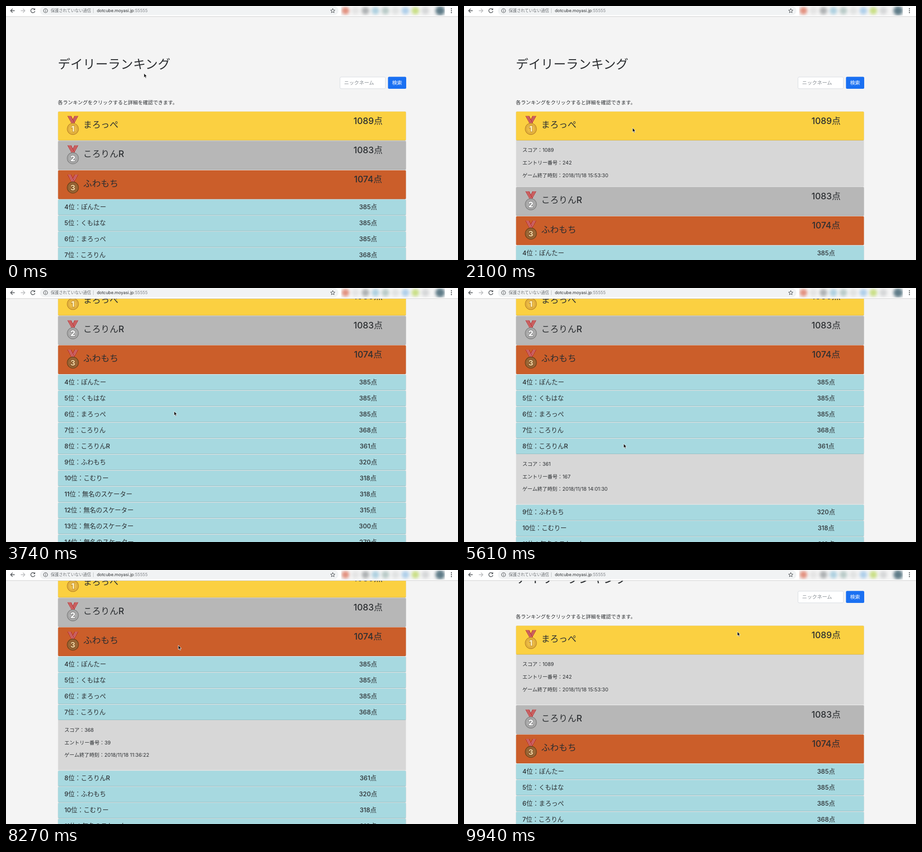
Write an HTML page that moves like this. It is 960 px wide and 540 px high and loops after 9.97 s.

```html
<!DOCTYPE html>
<html lang="ja">
<head>
<meta charset="utf-8">
<title>デイリーランキング</title>
<style>
html, body { margin: 0; height: 100%; overflow: hidden; background: #f4f4f4; }
svg { display: block; }
text { font-family: Inter, "Noto Sans CJK JP", "Noto Sans CJK", sans-serif; fill: #2b2e31; white-space: pre; }
.b { font-weight: 500; }
</style>
</head>
<body>
<svg id="stage" width="960" height="540" viewBox="0 0 960 540"></svg>
<script>
const LOOP = 9970, PANEL = 106.67, TOP = 224.3;
const BODY = 10.67, H5 = 13.33, H3 = 18.67, H1 = 26.67;

// Rank order: name, score, and optionally entry number, end time, toggles [ms, open]
const rows = [
  ['まろっぺ', 1089, 242, '15:53:30', [[1250, 1], [2069, 0], [9250, 1]]],
  ['ころりんR', 1083],
  ['ふわもち', 1074],
  ['ぽんたー', 385],
  ['くもはな', 385],
  ['まろっぺ', 385],
  ['ころりん', 368, 39, '11:36:22', [[6900, 1]]],
  ['ころりんR', 361, 167, '14:01:30', [[4550, 1], [6150, 0]]],
  ['ふわもち', 320],
  ['こむりー', 318],
  ['無名のスケーター', 318],
  ['無名のスケーター', 315],
  ['無名のスケーター', 300],
  ['無名のスケーター', 279],
];
const rowColors = ['#fbd041', '#b7b7b7', '#cb5e2a'];
// Disc, rim and digit colours
const medals = [
  ['#edbd45', '#c08a2a', '#fff3c4'],
  ['#b3b3b3', '#808080', '#ffffff'],
  ['#a56e3c', '#6b4219', '#f1cf9c'],
];

// Text placed by its vertical centre; Latin letters and digits can be medium weight
function text(s, x, cy, size, { fill, anchor, medium } = {}) {
  const body = medium ? s.replace(/\w+/g, '<tspan class="b">$&</tspan>') : s;
  return `<text x="${x}" y="${cy + size * 0.36}" font-size="${size}"` +
    (anchor ? ` text-anchor="${anchor}"` : '') +
    (fill ? ` style="fill:${fill}"` : '') + `>${body}</text>`;
}

function rect(x, y, w, h, fill, extra = '') {
  return `<rect x="${x}" y="${y}" width="${w}" height="${h}" fill="${fill}" ${extra}/>`;
}

function medal(i) {
  const [disc, rim, digit] = medals[i];
  const band = `<path d="M-11.5-27.5H-3.5L4-12H-3Z" fill="#b92f33"/>
    <path d="M-9-27.5L-1.2-12M-6.2-27.5L1.8-12" stroke="#f1dcd2" stroke-width=".8"/>`;
  return `<g transform="translate(142 37)">
    <g transform="scale(-1 1)">${band}</g>${band}
    <circle r="11.8" fill="${disc}" stroke="${rim}" stroke-width="1.6"/>
    <circle r="9" fill="none" stroke="${rim}" stroke-width=".7"/>
    <text y="6" font-size="16.5" font-weight="800" text-anchor="middle" stroke="${rim}"
      stroke-width="2" paint-order="stroke" style="fill:${digit}">${i + 1}</text></g>`;
}

const pitch = i => i < 3 ? 62.33 : 34;

function row([name, score, entry, time], i) {
  const big = i < 3, h = pitch(i) - 0.9, size = big ? H3 : H5;
  const label = big ? text(name, 164, 28, size, { medium: true })
    : text(`${i + 1}位：${name}`, 124, 15.8, size, { medium: true });
  const panel = !entry ? '' : `<svg class="panel" x="110" y="${h}" width="740" height="0">
    ${rect(0.6, 0, 738.8, PANEL, '#d7d7d7')}
    ${text(`スコア：${score}`, 14, 20.9, BODY)}
    ${text(`エントリー番号：${entry}`, 14, 47.6, BODY)}
    ${text(`ゲーム終了時刻：2018/11/18 ${time}`, 14, 74.3, BODY)}</svg>`;
  return `<g class="row">${panel}
    ${rect(110, -0.4, 740, h + 0.4, '#dedede', 'rx="2.5"')}
    ${rect(110.6, 0.2, 738.8, h - 0.2, rowColors[i] || '#a7d9e0', 'rx="2"')}
    ${rect(110.6, h - 0.8, 738.8, 0.8, '#000', 'opacity=".17"')}
    ${big ? medal(i) : ''}${label}
    ${text(`${score}点`, 769, big ? 19.8 : 15.8, size, { anchor: 'middle', medium: true })}</g>`;
}

function toolbar() {
  const blobs = ['#e2907f', '#e4e4e4', '#adb1b3', '#aed0e0', '#b9cbc8', '#e0e2e2', '#afcfea', '#c9df86', '#d5d7d8']
    .map((c, i) => `<circle cx="${721 + i * 21.2}" cy="10" r="8" fill="${c}"/>`).join('');
  const arrow = '<path d="M4.5 0H-4M0-4.2L-4.2 0L0 4.2"/>';
  return `${rect(0, 0, 960, 22, '#fff')}${rect(0, 22, 960, 1, '#cfcfcf')}
    ${rect(72, 0.5, 634, 19, '#f1f3f4', 'rx="9.5"')}
    <g fill="none" stroke="#4d5155" stroke-width="1.4">
      <g transform="translate(14 10)">${arrow}</g>
      <g transform="translate(36 10) scale(-1 1)" stroke="#b9bbbd">${arrow}</g>
      <path d="M60.6 7.2A4.4 4.4 0 1 0 61.4 11"/><path d="M61.9 4.5V8.6H57.8Z" fill="#4d5155" stroke="none"/>
      <circle cx="84" cy="10" r="4.2" stroke-width="1.1"/><path d="M84 9.4V12.4M84 7.3V8.5" stroke-width="1.1"/>
      <path d="M694 5.4L695.3 8.6L698.7 8.8L696.1 11L696.9 14.3L694 12.5L691.1 14.3L691.9 11L689.3 8.8L692.7 8.6Z" stroke-width="1"/>
    </g>
    ${text('保護されていない通信', 95, 10, 8.6, { fill: '#6d7175' })}
    ${rect(185, 5, 0.8, 10, '#b5b8bb')}
    ${text('dotcube.moyasi.jp<tspan style="fill:#85898d">:55555</tspan>', 193, 10, 9.05)}
    <clipPath id="strip"><rect x="712" y="1" width="220" height="19.5"/></clipPath>
    <filter id="soft" x="-20%" y="-60%" width="140%" height="220%"><feGaussianBlur stdDeviation="3"/></filter>
    <g clip-path="url(#strip)">${rect(712, 1, 220, 20, '#f5f5f5')}
      <g filter="url(#soft)">${blobs}<circle cx="922" cy="10" r="10" fill="#5f7b88"/></g></g>
    ${[6, 10, 14].map(y => `<circle cx="946" cy="${y}" r="1.2" fill="#4d5155"/>`).join('')}`;
}

const stage = document.getElementById('stage');
stage.innerHTML = `${rect(0, 0, 960, 540, '#f4f4f4')}
  <g id="page">
    ${text('デイリーランキング', 110, 123.5, H1)}
    ${rect(709.4, 151, 96.4, 24.8, '#fff', 'rx="2.5" stroke="#ced4da" stroke-width=".8"')}
    ${text('ニックネーム', 718, 163.3, BODY, { fill: '#868c92' })}
    ${rect(811.3, 150.6, 38.7, 25.4, '#1a70f2', 'rx="2.5"')}
    ${text('検索', 830.6, 163.3, BODY, { fill: '#fff', anchor: 'middle' })}
    ${text('各ランキングをクリックすると詳細を確認できます。', 110, 205.3, BODY)}
    ${rows.map(row).join('')}
  </g>
  ${rect(953.7, 22, 5, 0, '#6c6c6c', 'id="thumb" rx="2.5"')}
  ${toolbar()}
  <path id="cursor" d="M0 0V9.2L2.1 7.3L3.5 10.6L5.1 9.9L3.7 6.7H6.5Z" fill="#111" stroke="#fff" stroke-width=".8"/>`;

const [page, thumb, cursor] = ['page', 'thumb', 'cursor'].map(id => document.getElementById(id));
const groups = [...stage.querySelectorAll('.row')];

const clamp = v => Math.min(1, Math.max(0, v));
const smooth = p => p * p * (3 - 2 * p);

// CSS "ease": cubic-bezier(.25, .1, .25, 1)
function ease(p) {
  let lo = 0, hi = 1;
  for (let i = 0; i < 18; i++) {
    const s = (lo + hi) / 2;
    if (0.75 * s * (1 - s) + s ** 3 < p) lo = s; else hi = s;
  }
  return 0.3 * lo * (1 - lo) ** 2 + 3 * lo * lo * (1 - lo) + lo ** 3;
}

function panelHeight(toggles, t) {
  let open = 0;
  for (const [at, to] of toggles) {
    if (t >= at) open = 1 - to + (2 * to - 1) * ease(clamp((t - at) / 350));
  }
  return open * PANEL;
}

// Momentum scrolling: start, from, to
const flicks = [[2522, 0, 227.3], [8450, 227.3, 106]];
function scrollAt(t) {
  let y = 0;
  for (const [at, from, to] of flicks) {
    const dt = t - at;
    if (dt >= 0) y = dt > 1000 ? to : to + (from - to) * Math.exp(-dt / 250 - (dt / 900) ** 4);
  }
  return y;
}
const thumbAlpha = t => Math.max(...flicks.map(([at]) =>
  t < at ? 0 : 1 - clamp((t - at - 950) / 220)));

const path = [
  [0, 293, 143], [150, 293, 143], [1050, 358, 259], [3150, 358, 259], [3600, 357, 262], [3850, 357, 262],
  [4400, 339, 331], [6350, 339, 331], [6750, 341, 298], [7400, 341, 298], [8150, 366, 160],
  [8600, 366, 160], [9150, 580.5, 131], [LOOP, 580.5, 131],
];
function cursorAt(t) {
  const i = path.findIndex(k => k[0] > t), [t0, x0, y0] = path[i - 1], [t1, x1, y1] = path[i];
  const p = smooth((t - t0) / (t1 - t0));
  return [x0 + (x1 - x0) * p, y0 + (y1 - y0) * p];
}

function draw(t) {
  let y = TOP, extra = 0;
  rows.forEach((r, i) => {
    groups[i].setAttribute('transform', `translate(0 ${y})`);
    y += pitch(i);
    if (!r[4]) return;
    const h = panelHeight(r[4], t);
    groups[i].querySelector('.panel').setAttribute('height', h);
    y += h;
    extra += h;
  });
  const scroll = scrollAt(t), ratio = 514 / (968 + extra);
  page.setAttribute('transform', `translate(0 ${-scroll})`);
  thumb.setAttribute('y', 20 + scroll * ratio);
  thumb.setAttribute('height', 518 * ratio);
  thumb.setAttribute('opacity', thumbAlpha(t));
  cursor.setAttribute('transform', `translate(${cursorAt(t)})`);
}

const start = performance.now();
function tick() {
  draw((performance.now() - start) % LOOP);
  requestAnimationFrame(tick);
}
tick();
</script>
</body>
</html>
```
